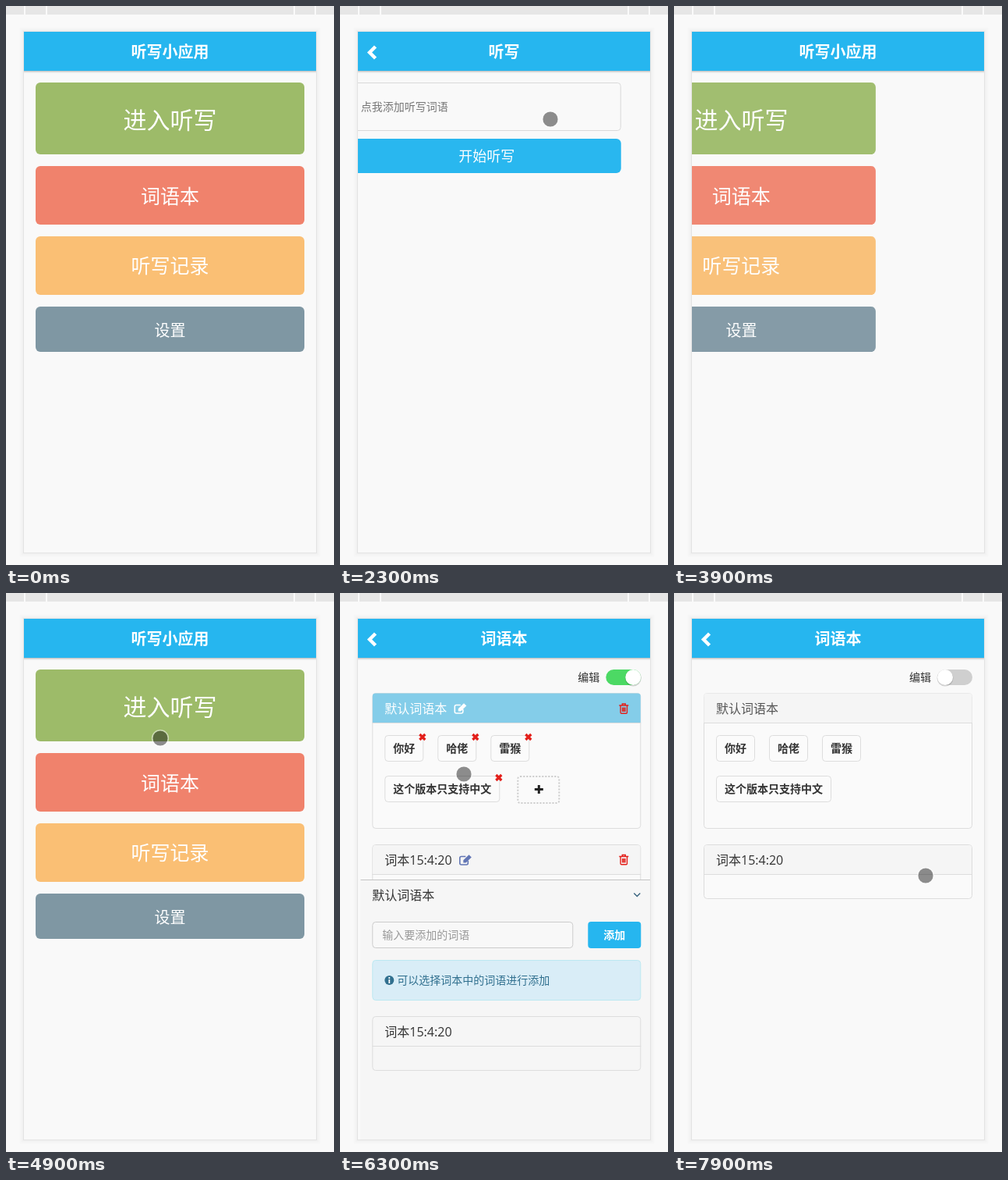
An HTML page for the animation above (8 s loop, 421 px wide and 716 px high).

```html
<!DOCTYPE html>
<html lang="zh-CN">
<head>
<meta charset="utf-8">
<title>听写小应用</title>
<style>
html, body { margin: 0; width: 100%; height: 100%; overflow: hidden; background: #f9f9f9; }
svg { display: block; }
text { font-family: "Open Sans", "Noto Sans CJK SC", "Noto Sans CJK", sans-serif; }
</style>
</head>
<body>
<svg id="stage" width="421" height="716" viewBox="0 0 421 716"></svg>
<script>
const LOOP = 8000, STEP = 100;
const BLUE = '#26b6ef', RED = '#e3201b', INK = '#333';

// text placed by the vertical centre of its glyphs
const label = (s, x, cy, size, fill, more = '') =>
  `<text x="${x}" y="${cy + size * 0.37}" font-size="${size}" fill="${fill}" ${more}>${s}</text>`;
const mid = 'text-anchor="middle"', bold = 'font-weight="700"';
const box = (x, y, w, h, r, fill, more = '') =>
  `<rect x="${x}" y="${y}" width="${w}" height="${h}" rx="${r}" fill="${fill}" ${more}/>`;
const frame = (x, y, w, h, fill, line) =>
  box(x + 0.5, y + 0.5, w - 1, h - 1, 4, fill, `stroke="${line}"`);
const button = (id, y, h, fill, s, cy, size) =>
  box(38, y, 345, h, 6, fill, `id="${id}"`) + label(s, 210.5, cy, size, '#fff', mid);

const pencil = (x, y, c) => `<g transform="translate(${x} ${y})">
  <path d="M11.5 8.5v3a2 2 0 0 1-2 2h-6.500a2 2 0 0 1-2-2v-6.500a2 2 0 0 1 2-2h5.500" fill="none" stroke="${c}" stroke-width="1.6"/>
  <path d="M5.500 7.800L12.700 0.800L16 4L8.800 11H5.500z" fill="${c}"/></g>`;
const trash = (x, y) => `<path transform="translate(${x} ${y})" fill="none" stroke="${RED}" stroke-width="1.4"
  d="M0 3h12M4 3V1h4v2M1.800 3v9q0 1.300 1.200 1.300h6q1.200 0 1.200-1.300V3M4.300 5.500v5.500M6 5.500v5.500M7.700 5.500v5.500"/>`;
const cross = (x, y) =>
  `<path d="M${x - 3.5} ${y - 3.5}l7 7m0-7l-7 7" stroke="${RED}" stroke-width="3.200"/>`;
const chip = (s, x, y, w) => frame(x, y, w, 34, '#fbfbfb', '#ddd') +
  label(s, x + w / 2, y + 17, 14, INK, mid + ' ' + bold);

const homePage = button('green', 98, 92, '#9dbb69', '进入听写', 146, 30) +
  button('red', 205, 75, '#f0826c', '词语本', 244, 25) +
  button('amber', 295, 75, '#fabf74', '听写记录', 333, 25) +
  button('slate', 385, 58, '#7f97a3', '设置', 415.5, 20);

const dictPage = frame(38, 98, 345, 62, '#f9f9f9', '#d9d9d9') +
  label('点我添加听写词语', 49, 129, 14, '#757575') +
  button('start', 170, 44, BLUE, '开始听写', 192, 18);

const sheet = `<svg id="sheet" x="23" width="375" overflow="hidden"><g transform="translate(-23 0)">` +
  box(23, 0, 375, 333, 0, '#f6f6f6') + box(23, 0, 375, 1, 0, '#c4c4c4') +
  label('默认词语本', 38, 20, 16, INK) +
  `<path d="M374 17.500l4 4l4-4" fill="none" stroke="#3b6580" stroke-width="1.4"/>` +
  frame(38, 54, 258, 34, '#f8f8f8', '#ccc') +
  label('输入要添加的词语', 51, 71, 14, '#999') +
  box(315, 54, 68, 34, 4, BLUE) + label('添加', 349, 71, 14, '#fff', mid + ' ' + bold) +
  frame(38, 103, 345, 52, '#d9edf7', '#bce8f1') +
  `<circle cx="60" cy="129" r="6" fill="#31708f"/><path d="M60 125v2m0 1v5" stroke="#fff" stroke-width="1.800"/>` +
  label('可以选择词本中的词语进行添加', 70, 129, 14, '#31708f') +
  frame(38, 175, 345, 70, 'none', '#ddd') + box(38, 213, 345, 1, 0, '#ddd') +
  label('词本15:4:20', 54, 195, 16, INK) +
  box(395, 0, 3, 144, 0, '#bfbfbf', 'id="scroll"') + '</g></svg>';

const bookPage = label('编辑', 302, 108, 14, INK) +
  box(338, 98, 45, 20, 10, '#4cd964', 'id="track"') +
  `<g id="knob"><circle cy="109" r="10.500" fill="#000" opacity=".16"/><circle cy="108" r="10" fill="#fff"/></g>` +
  frame(38, 128, 345, 174, '#fafafa', '#ddd') +
  `<path id="head" d="M38.500 166V132q0-3.500 3.500-3.500H379q3.500 0 3.500 3.500V166z"/>` +
  box(38, 166, 345, 1, 0, '#ddd') +
  label('默认词语本', 54, 148, 16, '#fff', 'id="name"') +
  chip('你好', 54, 182, 50) + chip('哈佬', 122, 182, 50) + chip('雷猴', 190, 182, 50) +
  chip('这个版本只支持中文', 54, 234, 148) +
  frame(38, 322, 345, 70, '#fafafa', '#ddd') +
  box(39, 323, 343, 38, 3, '#f5f5f5') + box(38, 360, 345, 1, 0, '#ddd') +
  label('词本15:4:20', 54, 342, 16, INK) +
  '<g id="edit">' + pencil(143, 140.5, '#fff') + trash(355, 141) +
  pencil(149.5, 334.5, '#6276b5') + trash(355, 334.5) +
  cross(102.5, 184.5) + cross(170.5, 184.5) + cross(238.5, 184.5) + cross(200.5, 236.5) +
  box(225, 235, 53, 34, 3, 'none', 'stroke="#ccc" stroke-width="2" stroke-dasharray="2 2"') +
  '<path d="M246.500 251.500h11m-5.500-5.500v11" stroke="#222" stroke-width="3"/></g>' + sheet;

const $ = id => document.getElementById(id);
const set = (id, attrs) => { for (const k in attrs) $(id).setAttribute(k, attrs[k]); };

$('stage').innerHTML =
  '<clipPath id="screen"><rect x="23" y="83" width="375" height="617"/></clipPath>' +
  box(0, 0, 421, 716, 0, '#f9f9f9') + box(0, 0, 421, 11, 0, '#e6e6e6') +
  [23, 51, 369, 396].map(x => box(x, 0, 2, 11, 0, '#fafafa')).join('') +
  [10, 6, 3].map(w => box(22.5, 32.5, 376, 668, 0, 'none', `stroke="#000" stroke-opacity=".012" stroke-width="${w}"`)).join('') +
  box(22.5, 32.5, 376, 668, 0, '#f9f9f9', 'stroke="#e4e4e4"') +
  `<g clip-path="url(#screen)"><g id="home">${homePage}</g><g id="dict">${dictPage}</g><g id="book">${bookPage}</g></g>` +
  [0.2, 0.1, 0.04].map((o, i) => box(23, 83 + i, 375, 1, 0, '#000', `opacity="${o}"`)).join('') +
  box(23, 33, 375, 50, 0, BLUE) +
  label('', 210.5, 59, 20, '#fff', `id="title" ${mid} ${bold}`) +
  '<path id="back" d="M45.500 52l-7.500 7.500l7.500 7.500" fill="none" stroke="#fff" stroke-width="4.500"/>' +
  '<g id="cursor"><circle r="9.800" fill="#111" fill-opacity=".47"/><circle r="10.300" fill="none" stroke="#fff" stroke-opacity=".5" stroke-width="1.600"/></g>';

const clamp = v => Math.max(0, Math.min(1, v));
const easeOut = p => 1 - (1 - p) ** 3;

// page changes: press time, moment the new page starts to fly in
const visits = [
  { page: 'home', at: -2000, fly: -2000 },
  { page: 'dict', at: 1900, fly: 1850 },
  { page: 'home', at: 3500, fly: 3520 },
  { page: 'book', at: 5500, fly: 5387 }
];
const titles = { home: '听写小应用', dict: '听写', book: '词语本' };
const bounce = [[0, -3000], [0.6, 25], [0.75, -10], [0.9, 5], [1, 0]];

function bounceX(p) {
  if (p >= 1) return 0;
  const i = Math.max(1, bounce.findIndex(k => k[0] > p));
  const [p0, x0] = bounce[i - 1], [p1, x1] = bounce[i];
  return x0 + (x1 - x0) * easeOut(clamp((p - p0) / (p1 - p0)));
}

// pointer strokes: time, x, y
const strokes = [
  [[400, 358, 105], [900, 279, 141], [1800, 279, 141], [1900, 270, 145],
   [2700, 270, 145], [3100, 44, 62], [3900, 44, 62]],
  [[4800, 200, 168], [4900, 198, 186], [5300, 159, 232], [6400, 159, 232],
   [7000, 364, 109], [7200, 364, 109], [7500, 335, 152], [7600, 335, 152],
   [7900, 323, 362], [8000, 323, 362]]
];

function pointer(t) {
  const s = strokes.find(k => t >= k[0][0] && t < k[k.length - 1][0]);
  if (!s) return null;
  const i = s.findIndex(k => k[0] > t);
  const [t0, x0, y0] = s[i - 1], [t1, x1, y1] = s[i];
  const p = (t - t0) / (t1 - t0);
  return [x0 + (x1 - x0) * p, y0 + (y1 - y0) * p];
}

function draw(t) {
  let n = visits.length - 1;
  while (visits[n].at > t) n--;
  const now = visits[n], old = n ? visits[n - 1].page : null;

  for (const id in titles) {
    let x = 0, o = 0;
    if (id === now.page) {
      const p = clamp((t - now.fly) / 1000);
      x = bounceX(p);
      o = easeOut(clamp(p / 0.6));
    } else if (id === old) {
      o = 1 - clamp((t - now.at) / 300);
    }
    set(id, { transform: `translate(${x} 0)`, opacity: o, display: o > 0 ? 'inline' : 'none' });
  }
  $('title').textContent = titles[now.page];
  set('back', { display: now.page === 'home' ? 'none' : 'inline' });
  set('green', { fill: t >= 1900 && t < 2300 ? '#96b860' : '#9dbb69' });
  set('red', { fill: t >= 5500 && t < 5900 ? '#ec775f' : '#f0826c' });

  const editing = t < 7200, off = clamp((t - 7100) / 300);
  set('knob', { transform: `translate(${373 - 25 * off} 0)` });
  set('track', { fill: editing ? '#4cd964' : '#cfcfcf' });
  set('head', { fill: editing ? '#84cde9' : '#f5f5f5' });
  set('name', { fill: editing ? '#fff' : '#555' });
  set('edit', { display: editing ? 'inline' : 'none' });

  const docked = t >= 6300, drop = clamp((t - 7200) / 300) ** 1.5;
  set('sheet', {
    y: docked ? 367 + 333 * drop : 284,
    height: docked ? 333 : 200,
    display: drop < 1 ? 'inline' : 'none'
  });
  set('scroll', { display: docked ? 'none' : 'inline' });

  const c = pointer(t);
  set('cursor', { display: c ? 'inline' : 'none' });
  if (c) set('cursor', { transform: `translate(${c[0]} ${c[1]})` });
}

const begin = performance.now();
function tick() {
  const t = (performance.now() - begin) % LOOP;
  draw(Math.floor(t / STEP) * STEP);
  requestAnimationFrame(tick);
}
tick();
</script>
</body>
</html>
```
